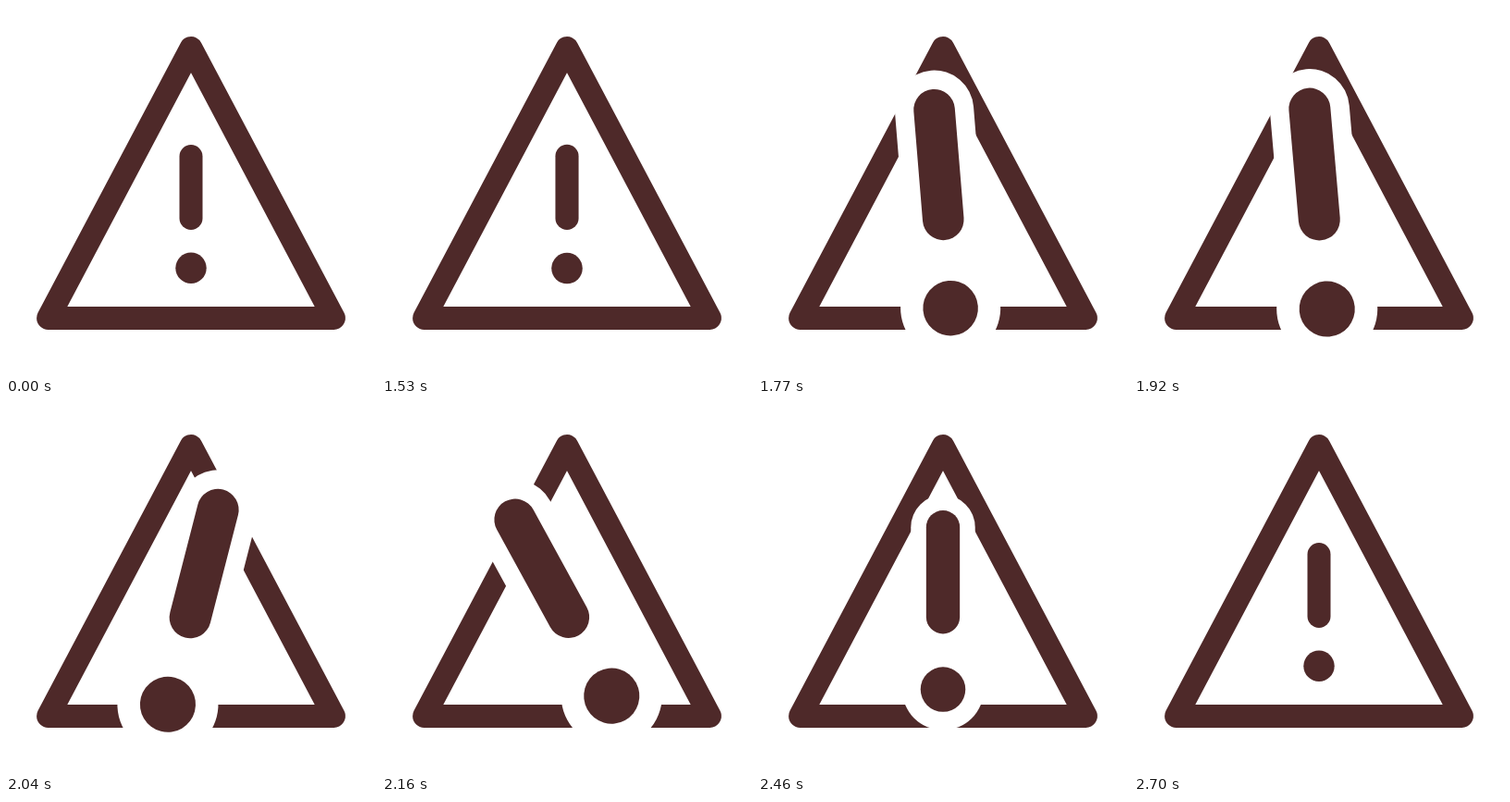
An HTML page with a canvas that plays this animation: 400 px wide and 400 px high, repeating every 2730 ms.

```html
<!DOCTYPE html>
<html lang="en">
<head>
<meta charset="utf-8">
<title>Warning sign</title>
<style>
  html, body { margin: 0; width: 100%; height: 100%; overflow: hidden; background: #fff; }
  canvas { display: block; }
</style>
</head>
<body>
<canvas id="stage" width="400" height="400"></canvas>
<script>
const ctx = document.getElementById('stage').getContext('2d');
const INK = '#4e2929';
const PAPER = '#fff';
const LOOP = 2730;
const STEP = 30;
const START = 50; // steps of rest before the motion
const PIVOT = { x: 200, y: 227.5 };

// Keys are [step, value], counted from START.
const SCALE = [[0.6, 1], [9.8, 1.8], [25.3, 1.8], [40, 1]];
const ANGLE = [[8, 0], [12, -30], [16.5, 30], [21, -30], [29, 0]];

const ease = u => u * u * (3 - 2 * u);

function valueAt(keys, step) {
  if (step <= keys[0][0]) return keys[0][1];
  for (let i = 1; i < keys.length; i++) {
    const [from, a] = keys[i - 1];
    const [to, b] = keys[i];
    if (step < to) return a + (b - a) * ease((step - from) / (to - from));
  }
  return keys[keys.length - 1][1];
}

function drawTriangle() {
  ctx.strokeStyle = INK;
  ctx.lineWidth = 25;
  ctx.lineJoin = 'round';
  ctx.beginPath();
  ctx.moveTo(200, 45.5);
  ctx.lineTo(354.4, 337.4);
  ctx.lineTo(45.6, 337.4);
  ctx.closePath();
  ctx.stroke();
}

function drawMark(color, barWidth, dotRadius) {
  ctx.strokeStyle = ctx.fillStyle = color;
  ctx.lineWidth = barWidth;
  ctx.lineCap = 'round';
  ctx.beginPath();
  ctx.moveTo(200, 162.6);
  ctx.lineTo(200, 229.4);
  ctx.stroke();
  ctx.beginPath();
  ctx.arc(200, 283.3, dotRadius, 0, 2 * Math.PI);
  ctx.fill();
}

function draw(now) {
  const step = Math.floor((now % LOOP) / STEP) - START;
  const scale = valueAt(SCALE, step);

  ctx.fillStyle = PAPER;
  ctx.fillRect(0, 0, 400, 400);
  drawTriangle();

  ctx.save();
  ctx.translate(PIVOT.x, PIVOT.y);
  ctx.rotate(valueAt(ANGLE, step) * Math.PI / 180);
  ctx.scale(scale, scale);
  ctx.translate(-PIVOT.x, -PIVOT.y);
  drawMark(PAPER, 47.8, 30.3);
  drawMark(INK, 25, 16.7);
  ctx.restore();
}

const startTime = performance.now();
function tick() {
  draw(performance.now() - startTime);
  requestAnimationFrame(tick);
}
tick();
</script>
</body>
</html>
```
